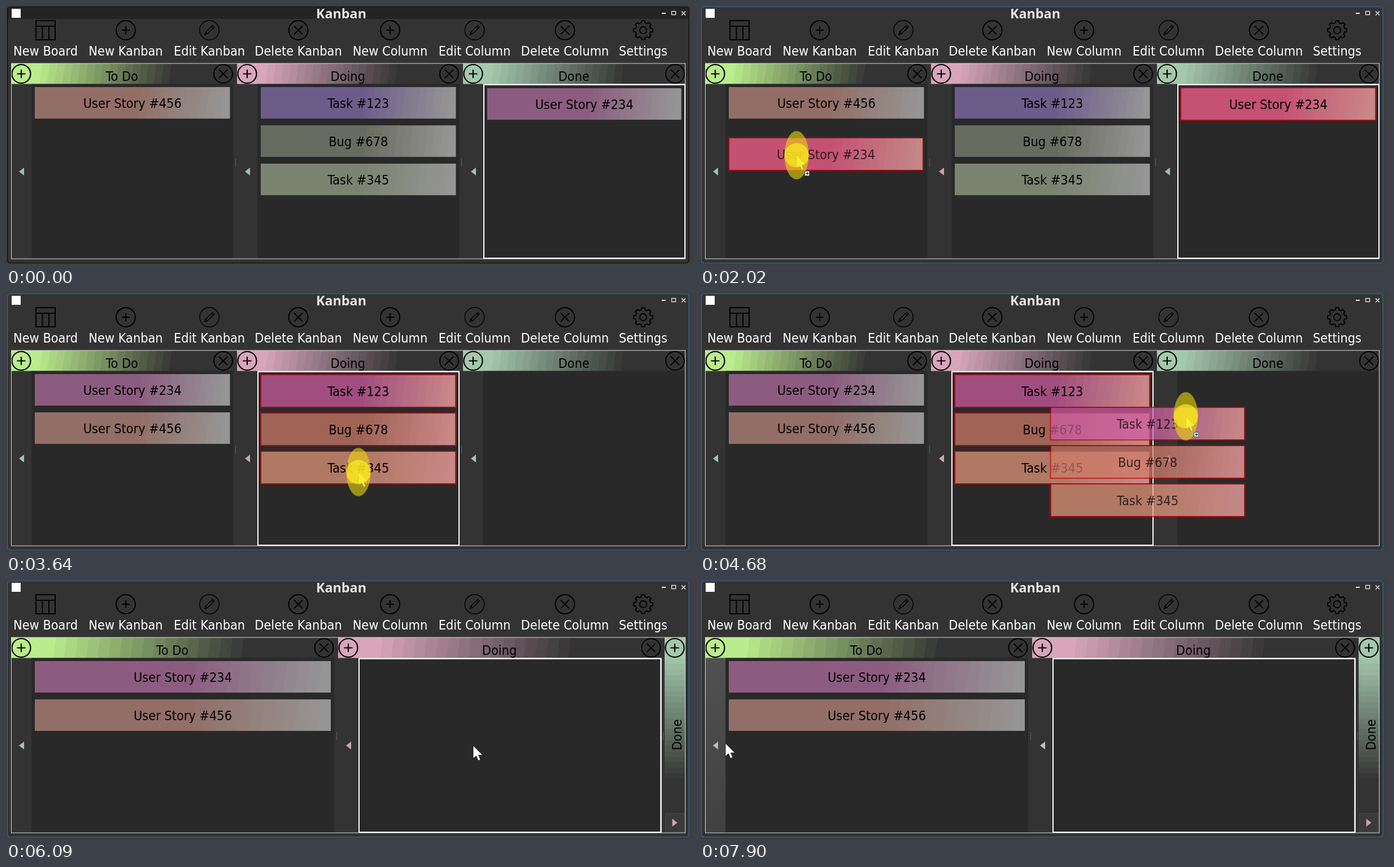
Recreate the animation shown at these times as an HTML page with a canvas. Size 1218 by 460 pixels, loop 8 s.

```html
<!DOCTYPE html>
<html lang="en">
<head>
<meta charset="utf-8">
<title>Kanban</title>
<style>
html, body { margin: 0; width: 100%; height: 100%; overflow: hidden; background: #3e3e3e; }
canvas { display: block; width: 1218px; height: 460px; }
</style>
</head>
<body>
<canvas id="stage" width="1218" height="460"></canvas>
<script>
const ctx = document.getElementById('stage').getContext('2d');
const LOOP = 8000;
const FONT = '23.3px "DejaVu Sans Condensed", Roboto, sans-serif';
const TITLE_FONT = 'bold 23.3px "Noto Sans", "Open Sans", sans-serif';
const PANEL = [51, 51, 51], LIST = '#292929';
const GREEN = [158, 196, 172], PINK = [206, 162, 172], GREY = [190, 190, 190];

// normal and selected colour of each card
const CARDS = {
  456: { text: 'User Story #456', base: [146, 110, 102], hot: [176, 96, 86] },
  234: { text: 'User Story #234', base: [140, 92, 128], hot: [197, 81, 115] },
  123: { text: 'Task #123', base: [108, 92, 138], hot: [160, 78, 128] },
  678: { text: 'Bug #678', base: [104, 107, 95], hot: [160, 99, 86] },
  345: { text: 'Task #345', base: [124, 131, 112], hot: [177, 120, 100] }
};
const TRIO = [123, 678, 345];

// pointer path: time, x, y
const PATH = [
  [400, 1070, 400], [1200, 971, 176], [1400, 971, 176], [1620, 840, 163],
  [2020, 171, 265], [2220, 171, 265], [2640, 609, 349], [3040, 680, 163],
  [3240, 672, 175], [3640, 624, 318], [4060, 691, 162], [4260, 702, 168],
  [4680, 860, 219], [5080, 1078, 163], [5280, 1097, 157], [5480, 900, 335],
  [5890, 827, 294], [6090, 827, 294], [6690, 543, 236], [7100, 624, 290],
  [7900, 45, 290]
];
const PRESSES = [[1200, 2220], [3040, 3240], [3640, 3860], [4060, 5480], [5890, 6090]];

// the screen refreshes in bursts of 200 ms steps
const BURSTS = [[400, 1400], [1620, 2420], [2640, 2640], [2840, 3640], [3860, 3860],
  [4060, 4460], [4680, 5080], [5280, 5480], [5890, 6690], [6880, 6880], [7100, 7900]];

function snap(t) {
  let s = 0;
  for (const [a, b] of BURSTS) {
    if (t >= a) s = Math.min(b, a + Math.floor((t - a) / 200) * 200);
  }
  return s;
}

function pointerAt(t) {
  for (let i = PATH.length - 1; i >= 0; i--) {
    const [t0, x0, y0] = PATH[i];
    if (t < t0) continue;
    const [t1, x1, y1] = PATH[i + 1] || [t0 + 1, x0, y0];
    const k = Math.min(1, (t - t0) / (t1 - t0));
    return { x: x0 + (x1 - x0) * k, y: y0 + (y1 - y0) * k };
  }
  return null;
}

const rgb = c => `rgb(${c.map(Math.round).join(',')})`;
const mix = (a, b, k) => a.map((v, i) => v + (b[i] - v) * k);

function box(x, y, w, h, fill) {
  ctx.fillStyle = fill;
  ctx.fillRect(x, y, w, h);
}

function frame(x, y, w, h, color, width) {
  ctx.strokeStyle = color;
  ctx.lineWidth = width;
  ctx.strokeRect(x, y, w, h);
}

function lines(color, width, ...polys) {
  ctx.strokeStyle = color;
  ctx.lineWidth = width;
  ctx.beginPath();
  for (const p of polys) p.forEach(([x, y], i) => i ? ctx.lineTo(x, y) : ctx.moveTo(x, y));
  ctx.stroke();
}

function shape(points, fill) {
  ctx.fillStyle = fill;
  ctx.beginPath();
  points.forEach(([x, y]) => ctx.lineTo(x, y));
  ctx.closePath();
  ctx.fill();
}

function ring(x, y, r, width) {
  ctx.strokeStyle = '#000';
  ctx.lineWidth = width;
  ctx.beginPath();
  ctx.arc(x, y, r, 0, 7);
  ctx.stroke();
}

function label(s, x, y, fill = '#000', font = FONT) {
  ctx.font = font;
  ctx.textAlign = 'center';
  ctx.fillStyle = fill;
  ctx.fillText(s, x, y);
}

// stepped gradient with slightly leaning bands
function bands(x0, y0, len, from, to, steps, vertical) {
  const lean = 0.14, n = len / (1 + lean * lean);
  const g = vertical ? ctx.createLinearGradient(0, y0, 0, y0 + len)
                     : ctx.createLinearGradient(x0, y0, x0 + n, y0 + n * lean);
  for (let i = 0; i < steps; i++) {
    const c = rgb(mix(from, to, i / (steps - 1)));
    g.addColorStop(i / steps, c);
    g.addColorStop((i + 1) / steps, c);
  }
  return g;
}

function plus(x, y, r, arm, width) {
  ring(x, y, r, width);
  lines('#000', width, [[x - arm, y], [x + arm, y]], [[x, y - arm], [x, y + arm]]);
}

function cross(x, y, r, arm, width) {
  ring(x, y, r, width);
  lines('#000', width, [[x - arm, y - arm], [x + arm, y + arm]],
    [[x + arm, y - arm], [x - arm, y + arm]]);
}

function pencil(x, y) {
  ring(x, y, 17.2, 1.4);
  ctx.save();
  ctx.translate(x, y);
  ctx.rotate(Math.PI / 4);
  lines('#000', 1.4, [[-2.2, 7], [-2.2, -10], [2.2, -10], [2.2, 7], [0, 11.5], [-2.2, 7], [2.2, 7]],
    [[-2.2, -7], [2.2, -7]]);
  ctx.restore();
}

function table(x, y) {
  frame(x - 17, y - 17, 34, 34, '#000', 2);
  lines('#000', 2, [[x - 17, y - 7], [x + 17, y - 7]],
    [[x - 5.5, y - 7], [x - 5.5, y + 17]], [[x + 6, y - 7], [x + 6, y + 17]]);
}

function gear(x, y) {
  const pts = [];
  for (let i = 0; i < 8; i++) {
    for (const [da, r] of [[-0.25, 13.5], [-0.16, 17], [0.16, 17], [0.25, 13.5]]) {
      const a = i * Math.PI / 4 + da;
      pts.push([x + r * Math.sin(a), y - r * Math.cos(a)]);
    }
  }
  ctx.lineJoin = 'round';
  lines('#000', 2, [...pts, pts[0], pts[1]]);
  ctx.lineJoin = 'miter';
  ring(x, y, 6.2, 2);
}

const TOOLS = [
  ['New Board', 70, table],
  ['New Kanban', 212, (x, y) => plus(x, y, 17, 7, 2)],
  ['Edit Kanban', 360, pencil],
  ['Delete Kanban', 517.5, (x, y) => cross(x, y, 17, 7.5, 2)],
  ['New Column', 680, (x, y) => plus(x, y, 17, 7, 2)],
  ['Edit Column', 829.5, pencil],
  ['Delete Column', 989.5, (x, y) => cross(x, y, 17, 7.5, 2)],
  ['Settings', 1128, gear]
];

function drawWindow(active) {
  box(0, 0, 1218, 460, '#3e3e3e');
  ctx.beginPath();
  ctx.roundRect(2.5, 1.5, 1206.5, 455, 5);
  ctx.fillStyle = rgb(PANEL);
  ctx.fill();
  if (!active) box(3, 2, 1206, 21, '#242424');
  ctx.strokeStyle = active ? '#2f68a6' : '#0c0c0c';
  ctx.lineWidth = 1.2;
  ctx.stroke();
  box(10, 5, 16, 16, '#fff');
  label('Kanban', 593.5, 22, '#e6e6e6', TITLE_FONT);
  box(1161, 12, 7, 2, '#eee');
  frame(1178.5, 9.5, 7, 6, '#eee', 1.3);
  lines('#eee', 1.4, [[1196, 9.5], [1203, 16.5]], [[1203, 9.5], [1196, 16.5]]);
  for (const [name, x, icon] of TOOLS) {
    icon(x, 43);
    label(name, x, 88, '#fff');
  }
}

function drawCard(id, x, y, w, h, hot, ghost) {
  const card = CARDS[id];
  let from = hot ? card.hot : card.base;
  let to = hot ? [201, 135, 135] : [149, 149, 149];
  let edge = [148, 16, 20];
  if (ghost) {
    // lift the colours so they keep their look over the dark list
    [from, to, edge] = [from, to, edge].map(c => c.map(v => Math.max(0, (v - 11.5) / 0.72)));
  }
  box(x, y, w, h, bands(x + w * 0.5, y + h / 2, w * 0.5, from, to, 13));
  if (hot) frame(x - 1, y - 1, w + 2, h + 2, rgb(edge), 2);
  label(card.text, x + w / 2, y + h / 2 + 9);
}

function arrow(x, y, dir, color) {
  shape([[x + 4.5 * dir, y - 7], [x + 4.5 * dir, y + 7], [x - 4.5 * dir, y]], rgb(color));
}

function splitter(x) {
  for (let y = 271; y < 284; y += 2) box(x, y, 1, 1, '#8a8a8a');
}

function drawColumn(c) {
  const { x, w } = c, right = x + w;
  box(x, 102, w, 36.5, bands(x + w * 0.1, 120, w * 0.65, c.color, PANEL, 19));
  plus(x + 18, 120.5, 16.5, 7.5, 2.2);
  cross(right - 18, 120.5, 16.5, 7.5, 2);
  label(c.name, x + w / 2 - 0.5, 133);
  if (c.hover) {
    const g = ctx.createLinearGradient(0, 139, 0, 448);
    g.addColorStop(0, '#515151');
    g.addColorStop(1, '#414141');
    box(x + 1, 139, 35, 309, g);
  }
  arrow(x + 18.5, 294, 1, c.arrow);
  box(x + 36, 138.5, w - 36, 310.5, LIST);
  if (c.focus) frame(x + 37, 139.5, w - 37.5, 308.5, '#fff', 2);
  const inset = c.focus ? 1 : 0;
  c.cards.forEach((id, i) => drawCard(id, x + 42 + inset, 144 + inset * 2 + i * 68,
    w - 48 - inset * 2, 56, c.hot.includes(id)));
}

function drawFolded() {
  box(1166, 102, 37, 347, rgb(PANEL));
  box(1166, 102, 37, 30, rgb([164, 200, 172]));
  box(1166, 130, 37, 232, bands(0, 130, 232, [164, 200, 172], PANEL, 24, true));
  plus(1184, 120.5, 16.5, 7.5, 2.2);
  ctx.save();
  ctx.translate(1196, 275);
  ctx.rotate(-Math.PI / 2);
  label('Done', 0, 0);
  ctx.restore();
  box(1167, 414, 34, 34, '#3a3a3a');
  frame(1167.5, 414.5, 33, 33, '#474747', 1);
  arrow(1184, 431, -1, PINK);
}

function drawBoard(t) {
  const folded = t >= 6090, moved = t >= 2220, dropped = t >= 5480;
  const w = folded ? 572 : 393.5, step = folded ? 579 : 400;
  const doingHot = t >= 3640 ? TRIO : t >= 3040 ? [123] : [];
  const columns = [
    { name: 'To Do', color: [186, 236, 141], cards: moved ? [234, 456] : [456], hot: [],
      arrow: t >= 7700 ? GREY : GREEN, hover: t >= 7900 },
    { name: 'Doing', color: [216, 165, 187], cards: dropped ? [] : TRIO, hot: doingHot,
      focus: t >= 3040, arrow: t >= 7100 ? GREY : t >= 1200 ? PINK : GREEN,
      hover: t >= 7100 && t < 7300 },
    { name: 'Done', color: [164, 200, 172], cards: dropped ? TRIO : moved ? [] : [234],
      hot: t >= 1200 && !moved ? [234] : [], focus: t < 3040,
      arrow: t >= 4680 ? [204, 140, 140] : GREEN }
  ];
  columns.forEach((c, i) => {
    if (folded && i === 2) return drawFolded();
    drawColumn({ ...c, x: 9 + step * i, w });
  });
  splitter(folded ? 585 : 406);
  splitter(folded ? 1163 : 806);
  frame(9.5, 102, 1193, 347, '#dcdcdc', 1);
  columns.forEach((c, i) => {
    if (c.focus) frame(9 + step * i + 37, 139.5, w - 37.5, 308.5, '#fff', 2);
  });
}

function drawGhosts(ids, x, y) {
  ctx.globalAlpha = 0.72;
  ids.forEach((id, i) => drawCard(id, x + 2, y + 2 + i * 68, 342, 56, true, true));
  ctx.globalAlpha = 1;
}

function drawPointer({ x, y }, pressed, dragging) {
  const tip = [[0, 0], [0, 23], [5.5, 18.5], [9, 27], [13, 25], [9.5, 17], [17, 17], [0, 0]]
    .map(([dx, dy]) => [x + dx, y + dy]);
  shape(tip, '#fff');
  lines('rgba(0,0,0,.75)', 1, tip);
  if (pressed) {
    for (const [ry, fill] of [[43, 'rgba(235,217,10,.6)'], [21.5, 'rgba(255,240,30,.68)']]) {
      ctx.fillStyle = fill;
      ctx.beginPath();
      ctx.ellipse(x, y, 21.5, ry, 0, 0, 7);
      ctx.fill();
    }
  }
  if (dragging) {
    const bx = Math.round(x) + 14, by = Math.round(y) + 28;
    box(bx, by, 9, 9, '#fff');
    frame(bx + 0.5, by + 0.5, 8, 8, '#555', 1);
    box(bx + 2, by + 4, 3, 1, '#000');
    shape([[bx + 4.5, by + 2], [bx + 7.5, by + 4.5], [bx + 4.5, by + 7]], '#000');
  }
}

function draw(now) {
  const t = snap(now % LOOP);
  drawWindow(t >= 1200);
  drawBoard(t);
  const p = pointerAt(t);
  if (p) {
    const first = t >= 1620 && t < 2220, second = t >= 4260 && t < 5480;
    if (first) drawGhosts([234], p.x - 121, p.y - 32);
    if (second) drawGhosts(TRIO, p.x - 240.5, p.y - 17);
    drawPointer(p, PRESSES.some(([a, b]) => t >= a && t < b), first || second);
  }
}

const start = performance.now();
function tick() {
  draw(performance.now() - start);
  requestAnimationFrame(tick);
}
tick();
</script>
</body>
</html>
```
